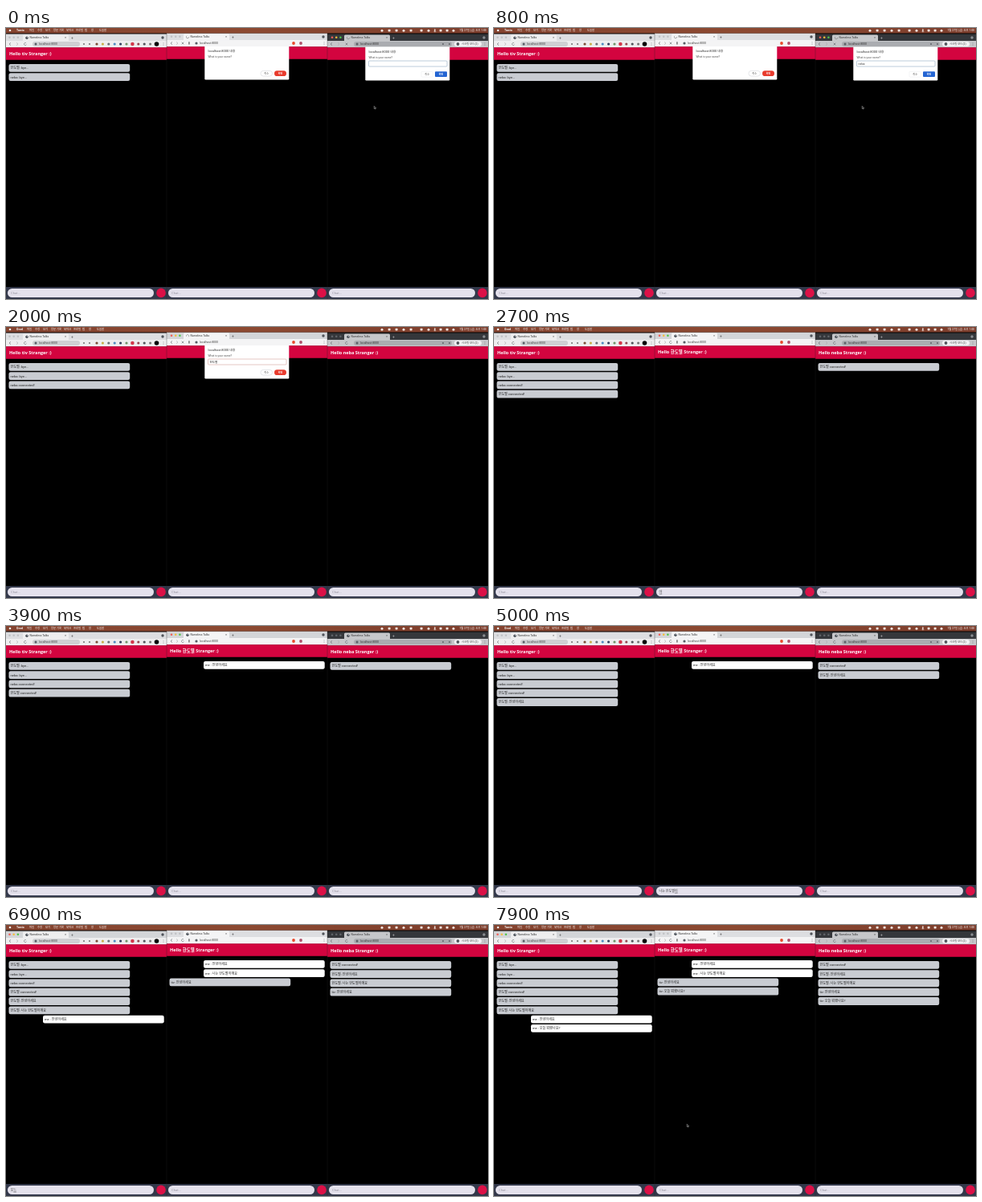
Write an HTML page with a canvas that moves like this. It is 600 by 338 pixels and loops after 8000 ms.

```html
<!DOCTYPE html>
<html lang="ko">
<head>
<meta charset="utf-8">
<title>Chat demo</title>
<style>
html, body { margin: 0; width: 100%; height: 100%; overflow: hidden; background: #000; }
canvas { display: block; }
</style>
</head>
<body>
<canvas id="stage" width="600" height="338"></canvas>
<script>
const g = document.getElementById('stage').getContext('2d');
const LOOP = 8000;
const FONT = 'Roboto, "Noto Sans CJK KR", "Noto Sans CJK", sans-serif';
const BOLD = '"Open Sans", "Noto Sans CJK KR", "Noto Sans CJK", sans-serif';
const RED = '#d3043f';
const LIGHTS = ['#f25e57', '#f6bd3b', '#4fc54b'];

const LEFT = 'tiv', RIGHT = 'neba', MID = '한도별';
const HI = '안녕하세요', INTRO = `나는 ${MID}이에요`, ASK = '오늘 뭐했나요?';

// Messages per window: [time of arrival, text, own message?]
const wins = [
  { x: 0, y: 0, name: LEFT, joined: -1, active: t => t >= 5600, msgs: [
    [-1, MID + ': bye...'], [-1, RIGHT + ': bye...'], [900, RIGHT + ' connected!'],
    [2250, MID + ' connected!'], [4000, MID + ': ' + HI], [5500, MID + ': ' + INTRO],
    [6600, 'me : ' + HI, true], [7650, 'me : ' + ASK, true]] },
  { x: 200, y: -1, name: MID, joined: 2200, active: t => t >= 1000 && t < 5600, msgs: [
    [3800, 'me : ' + HI, true], [5400, 'me : ' + INTRO, true],
    [6700, LEFT + ': ' + HI], [7750, LEFT + ': ' + ASK]] },
  { x: 400, y: 0, name: RIGHT, joined: 900, active: t => t < 1000, dark: true, msgs: [
    [2250, MID + ' connected!'], [4000, MID + ': ' + HI], [5500, MID + ': ' + INTRO],
    [6700, LEFT + ': ' + HI], [7750, LEFT + ': ' + ASK]] }
];

// Typing sessions in the chat inputs: window, text, start, end, sent
const typing = [
  [1, HI, 2550, 3700, 3800], [1, INTRO, 4150, 5270, 5400],
  [0, HI, 5750, 6500, 6600], [0, ASK, 6750, 7550, 7650]
];

// Pointer moves: start, end, from, to, hidden after
const moves = [
  [900, 1150, 459, 99, 273, 43, 1450], [2250, 2500, 273, 43, 250, 330, 2600],
  [5450, 5650, 250, 330, 60, 330, 5750], [7650, 7880, 60, 330, 241, 250, LOOP]
];

function box(x, y, w, h, fill, r = 0, stroke) {
  g.beginPath();
  g.roundRect(x, y, w, h, r);
  if (fill) { g.fillStyle = fill; g.fill(); }
  if (stroke) { g.strokeStyle = stroke; g.lineWidth = .6; g.stroke(); }
}
function dot(x, y, r, fill) {
  g.beginPath();
  g.arc(x, y, r, 0, 7);
  g.fillStyle = fill;
  g.fill();
}
function line(color, width, ...p) {
  g.beginPath();
  for (let i = 0; i < p.length; i += 2) g.lineTo(p[i], p[i + 1]);
  g.strokeStyle = color;
  g.lineWidth = width;
  g.stroke();
}
function arc(x, y, r, a, b, color) {
  g.beginPath();
  g.arc(x, y, r, a, b);
  g.strokeStyle = color;
  g.lineWidth = .6;
  g.stroke();
}
function text(s, x, y, size, color, weight = 400, align = 'left', font = FONT) {
  g.font = `${weight} ${size}px ${font}`;
  g.textAlign = align;
  g.textBaseline = 'middle';
  g.fillStyle = color;
  g.fillText(s, x, y);
}

// Every state of the text while it is typed, with Hangul composed letter by letter
function keystrokes(s) {
  const leads = 'ㄱㄲㄴㄷㄸㄹㅁㅂㅃㅅㅆㅇㅈㅉㅊㅋㅌㅍㅎ';
  const out = [];
  let done = '';
  for (const c of s) {
    const k = c.charCodeAt(0) - 0xAC00;
    if (k >= 0 && k < 11172) {
      out.push(done + leads[Math.floor(k / 588)]);
      if (k % 28) out.push(done + String.fromCharCode(0xAC00 + k - k % 28));
    }
    out.push(done += c);
  }
  return out;
}
function typed(s, from, to, t) {
  if (t < from) return '';
  const keys = keystrokes(s);
  return keys[Math.min(keys.length - 1, Math.floor((t - from) / (to - from) * keys.length))];
}

function menuBar(t) {
  const fill = g.createLinearGradient(0, 0, 600, 0);
  fill.addColorStop(0, '#84432f');
  fill.addColorStop(.5, '#8c4931');
  fill.addColorStop(1, '#7c3d2c');
  box(0, 0, 600, 6.5, fill);
  const second = wins[1].active(t);
  dot(5, 3, 1.3, '#eee');
  text(second ? 'Orvel' : 'Tarvio', 13, 3.2, 3.5, '#fff', 700);
  const xs = [29, 39, 49, 59, 75, 87, 98, 106, 116];
  '파일,수정,보기,방문 기록,북마크,프로필,탭,창,도움말'.split(',')
    .forEach((s, i) => text(s, xs[i] - (second ? 3 : 0), 3.2, 3.3, '#fff'));
  [468, 477, 486, 495, 504, 517, 526, 541, 549, 557].forEach((x, i) =>
    i % 3 ? box(x - 1.3, 1.7, 2.8, 2.9, '#f3e7e2', .6) : dot(x, 3.2, 1.5, '#f3e7e2'));
  line('#f3e7e2', .6, 533, 2, 535, 4.5, 533.5, 5, 533.5, 1.4, 535, 2.3, 532.5, 4.2);
  text('7월 27일 (금) 오후 1:00', 598, 3.2, 3.4, '#fff', 400, 'right');
}

function toolbar(w, t) {
  const ink = '#5f6368';
  const mid = w.x === 200, loading = t < w.joined;
  const bar = w.dark ? '#c6c7ca' : mid ? '#f4f4f5' : '#eeeeef';
  box(0, 7.5, 200, 9, w.dark ? '#35373b' : w.active(t) ? '#d3d5d8' : '#dddee1');
  box(0, 16, 200, 8.5, bar);
  const lx = w.x ? 6 : 4.5;
  LIGHTS.forEach((c, i) => dot(lx + i * 5.2, 11.8, 1.3, w.active(t) ? c : w.dark ? '#62656a' : '#c0c2c5'));
  box(21, 8.6, 57, 8, bar, [1.5, 1.5, 0, 0]);
  if (loading) arc(26, 12.2, 1.6, t / 130, t / 130 + 4.2, '#777');
  else {
    dot(26, 12.2, 1.7, '#444a52');
    dot(26.5, 11.7, .7, '#b5bac0');
  }
  text('Nameless Talks', 29.5, 12.4, 3.35, '#333');
  text('×', 74, 12.3, 4, '#444', 400, 'center');
  text('+', 82.5, 12.3, 5, w.dark ? '#bbb' : '#555', 400, 'center');
  dot(195, 12, 1.7, w.dark ? '#8b8e92' : '#50545a');

  const nav = mid ? [6, 13, 20] : [5, 14, 24];
  line(ink, .6, nav[0] + 1, 18.3, nav[0] - 1, 20, nav[0] + 1, 21.7);
  line('#aaa', .6, nav[1] - 1, 18.3, nav[1] + 1, 20, nav[1] - 1, 21.7);
  if (loading) {
    line(ink, .6, nav[2] - 1.3, 18.7, nav[2] + 1.3, 21.3);
    line(ink, .6, nav[2] + 1.3, 18.7, nav[2] - 1.3, 21.3);
  } else arc(nav[2], 20, 1.5, .4, 5.5, ink);

  if (mid) {
    box(27, 18.2, 1.8, 3.4, '#888', .3);
    dot(37, 20, 1.6, '#555b63');
    dot(158, 20, 1.9, '#e8482c');
    dot(167, 20, 1.9, '#b0506a');
    text('localhost:8000', 41, 20.2, 3.5, '#444');
  } else if (w.dark) {
    box(33, 17, 122, 6, '#aaacb0', 3);
    dot(37, 20, 1.5, '#5b5f65');
    text('localhost:8000', 41, 20.2, 3.5, '#333');
    dot(144, 20, 1.1, '#63676c');
    dot(152, 20, 1.1, '#63676c');
    box(158, 17, 34, 6, '#f2f2f4', 3);
    dot(162.5, 20, 1.9, '#54585e');
    text('시크릿 모드(2)', 167, 20.2, 3.4, '#444');
  } else {
    box(33, 17, 59, 6, '#cfd0d3', 3);
    dot(37, 20, 1.5, '#555b63');
    text('localhost:8000', 41, 20.2, 3.5, '#444');
    dot(97, 20, 1.1, '#777');
    dot(104, 20, 1.1, '#777');
    ['#7a4d35', '#c9ac4a', '#697078', '#4f8ac0', '#34405f', '#6f9468', '#d2384b', '#92464f', '#50545a', '#777']
      .forEach((c, i) => dot(113 + i * 7.4, 20, i === 6 ? 2.3 : 1.6, c));
    dot(187.5, 20, 2.8, '#050505');
  }
  [18.3, 20, 21.7].forEach(y => dot(196, y, .4, ink));
}

function chat(w, t) {
  box(0, 24.3, 200, 15.4, RED);
  if (t >= w.joined) text(`Hello ${w.name} Stranger :)`, 4, 32.4, 5.5, '#fff', 700, 'left', BOLD);
  w.msgs.filter(m => t >= m[0]).forEach(([, s, own], n) => {
    const x = own ? 46 : 3.5, y = 44.9 + n * 11.3;
    box(x, y, 150.7, 9.8, own ? '#fff' : '#c9ccd2', 2.2);
    text(s, x + 2, y + 5.1, 4.1, '#222');
  });
}

function inputBar(i, t) {
  box(0, 323, 200, 15, '#33384a');
  box(2, 325, 182, 11, '#e4e1ec', 5.5);
  dot(193, 330.4, 5.8, '#dc1147');
  const job = typing.find(j => j[0] === i && t >= j[2] && t < j[4]);
  if (!job) return text('Chat...', 6, 330.8, 4.2, '#9996a3');
  const s = typed(job[1], job[2], job[3], t);
  text(s, 5.5, 330.8, 4, '#333');
  const end = 5.5 + g.measureText(s).width;
  line('#333', .5, end - 3.5, 333, end, 333);
}

// Prompt dialog inside a window
function dialog(w, s, t) {
  const on = w.active(t), blue = w.dark, y = blue ? 1 : 0;
  box(47.3, 23 + y / 2, 105, 41.4 + y / 2, '#fff', [0, 0, 1.2, 1.2]);
  text('localhost:8000 내용', 51.5, 29 + y, 3.9, '#333');
  text('What is your name?', 51.5, 36 + y, 3.4, '#555');
  if (on) box(51.5, 40 + y, 97.5, 7, '#fff', 1, blue ? '#93aec4' : '#d3a29b');
  text(s, 53.5, 43.8 + y, 3.6, '#333');
  box(117, 53.3 + y, 14.5, 6.8, '#fff', blue ? 1 : 3.4, blue ? '#eceef0' : '#d4d6da');
  box(134, 53.3 + y, 15, 6.8, blue ? '#2364d2' : '#e83b2d', blue ? 1 : 3.4);
  text('취소', 124.2, 56.9 + y, 3.1, '#555', 400, 'center');
  text('확인', 141.5, 56.9 + y, 3.1, '#fff', 700, 'center');
}

function pointer(t) {
  let x = 459, y = 99, hide = Infinity;
  for (const [a, b, x0, y0, x1, y1, end] of moves) {
    if (t < a) continue;
    const p = Math.min(1, (t - a) / (b - a)), e = p * p * (3 - 2 * p);
    x = x0 + (x1 - x0) * e;
    y = y0 + (y1 - y0) * e;
    hide = end;
  }
  if (t >= hide) return;
  if (t >= 1150 && t < 2250) {
    line('#777', .5, x - .8, y - 2, x + .8, y - 2);
    line('#777', .5, x, y - 2, x, y + 2);
    line('#777', .5, x - .8, y + 2, x + .8, y + 2);
    return;
  }
  g.beginPath();
  [[-.8, -1.6], [-.8, 1.6], [0, 1], [.6, 2.2], [1.2, 1.9], [.6, .8], [1.6, .8]]
    .forEach(([dx, dy]) => g.lineTo(x + dx, y + dy));
  g.closePath();
  g.fillStyle = '#111';
  g.fill();
  g.strokeStyle = '#ccc';
  g.lineWidth = .45;
  g.stroke();
}

function draw(t) {
  g.fillStyle = '#000';
  g.fillRect(0, 0, 600, 338);
  wins.forEach((w, i) => {
    g.save();
    g.translate(w.x, 0);
    g.beginPath();
    g.rect(0, 0, 200, 338);
    g.clip();
    g.save();
    g.translate(0, w.y);
    toolbar(w, t);
    chat(w, t);
    g.restore();
    inputBar(i, t);
    if (i === 1 && t < w.joined) dialog(w, typed(MID, 1250, 2100, t), t);
    if (i === 2 && t < w.joined) dialog(w, typed(RIGHT, 200, 750, t), t);
    g.restore();
  });
  [200, 400].forEach(x => line('#2226', .8, x, 7, x, 338));
  menuBar(t);
  pointer(t);
}

function tick() {
  draw(performance.now() % LOOP);
  requestAnimationFrame(tick);
}
tick();
</script>
</body>
</html>
```
